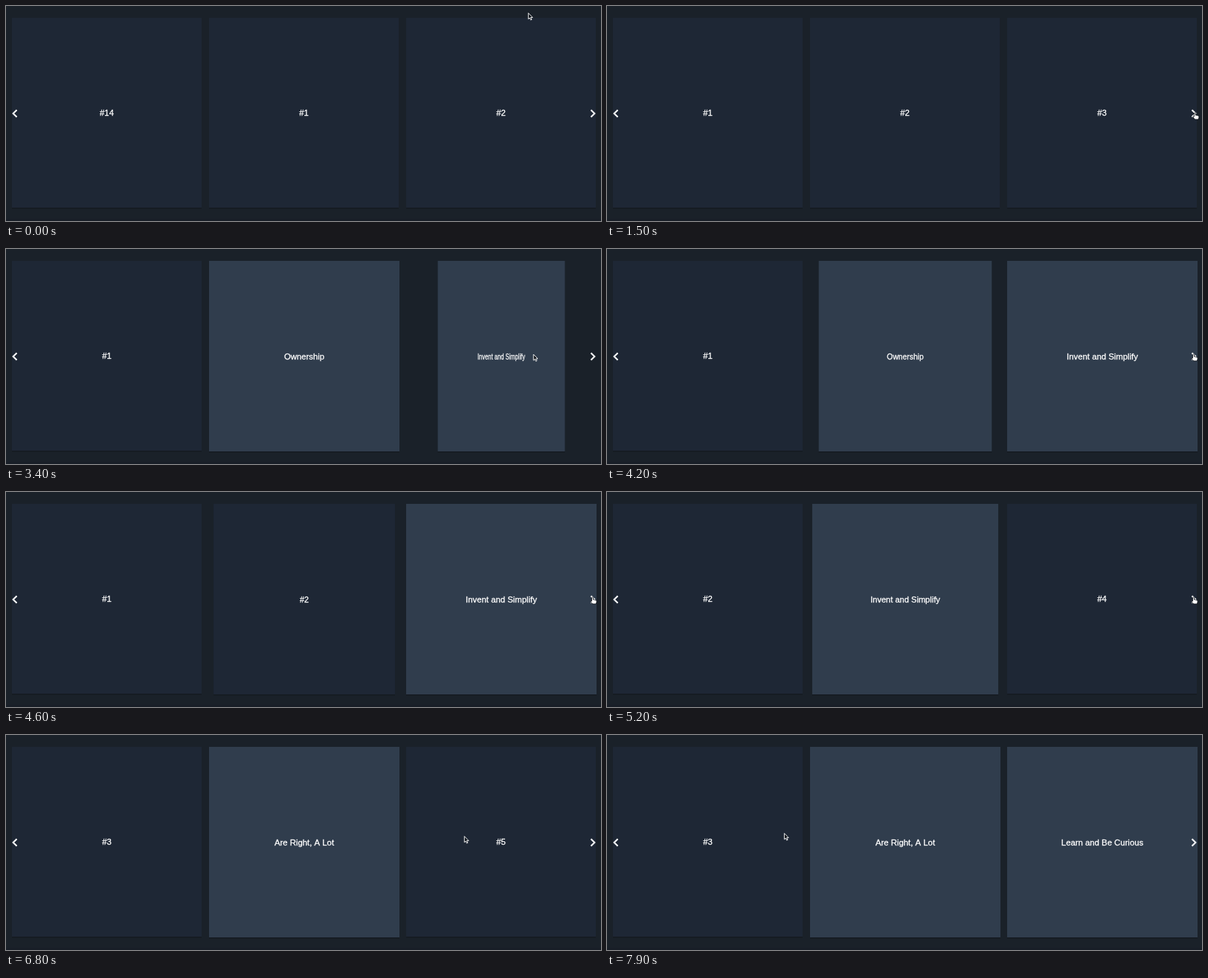
Recreate the animation shown at these times as an HTML page with a canvas. Size 800 px wide and 290 px high, loop 8000 ms.

```html
<!DOCTYPE html>
<html lang="en">
<head>
<meta charset="utf-8">
<title>Flip card carousel</title>
<style>
html, body { margin: 0; width: 100%; height: 100%; overflow: hidden; background: #1a2129; }
canvas { display: block; width: 800px; height: 290px; }
</style>
</head>
<body>
<canvas id="stage" width="800" height="290"></canvas>
<script>
const canvas = document.getElementById('stage');
const ctx = canvas.getContext('2d');
const dpr = window.devicePixelRatio || 1;
canvas.width = 800 * dpr;
canvas.height = 290 * dpr;

const LOOP = 8000, STEP = 100, FLIP = 800, SHIFT_DELAY = 550, COUNT = 14;
const FRONT = '#1e2735', BACK = '#303d4d';

const cards = [
  { id: 2, title: 'Ownership', open: 2100 },
  { id: 3, title: 'Invent and Simplify', open: 3050 },
  { id: 4, title: 'Are Right, A Lot', open: 6050 },
  { id: 5, title: 'Learn and Be Curious', open: 6950 }
];

// Clicks on the right arrow: the middle card closes, then the row moves on
const nextClicks = [750, 4100, 5135];

const moves = [
  { from: 100, to: 800, x: 790.3, y: 144 },
  { from: 1600, to: 2000, x: 486.3, y: 142 },
  { from: 2260, to: 3000, x: 707.3, y: 142 },
  { from: 3350, to: 3900, x: 788.5, y: 142 },
  { from: 5280, to: 5800, x: 480.3, y: 136.6 },
  { from: 6300, to: 6800, x: 616.3, y: 136.6 },
  { from: 7350, to: 7850, x: 238.4, y: 132.6 }
];

const clamp = v => Math.min(1, Math.max(0, v));
const smooth = p => p * p * (3 - 2 * p);

// CSS "ease": solve the Bezier for x, return y
function ease(x) {
  const bezier = (s, a, b) => 3 * (1 - s) * (1 - s) * s * a + 3 * (1 - s) * s * s * b + s * s * s;
  let lo = 0, hi = 1;
  for (let i = 0; i < 24; i++) {
    const mid = (lo + hi) / 2;
    if (bezier(mid, 0.25, 0.25) < x) lo = mid; else hi = mid;
  }
  return bezier(lo, 0.1, 1);
}

// 0 = front, 1 = back
function turnOf(id, t) {
  const card = cards.find(c => c.id === id);
  if (!card || t < card.open) return { turn: 0, moving: false };
  const close = nextClicks[id - 1];
  const closing = t >= close;
  const p = clamp((t - (closing ? close : card.open)) / FLIP);
  return { turn: closing ? 1 - ease(p) : ease(p), moving: p < 1, title: card.title };
}

function pointerAt(t) {
  let x = 702.3, y = 9.5;
  for (const m of moves) {
    const k = smooth(clamp((t - m.from) / (m.to - m.from)));
    x += (m.x - x) * k;
    y += (m.y - y) * k;
  }
  return { x, y };
}

function drawCard(id, slot, t) {
  const { turn, moving, title } = turnOf(id, t);
  const back = turn > 0.5;
  const lifted = back || moving;
  const w = lifted ? 256 : 255;
  const h = w + 1;
  const label = back ? title : '#' + id;
  const base = lifted ? 149 : 148.3;

  ctx.save();
  ctx.translate(8 + slot * 265 + w / 2, 0);
  ctx.scale(Math.max(Math.abs(Math.cos(turn * Math.PI)), 0.001), 1);
  ctx.fillStyle = 'rgba(0,0,0,0.2)';
  ctx.fillRect(-w / 2, 16 + h, w, 1.5);
  ctx.fillStyle = back ? BACK : FRONT;
  ctx.fillRect(-w / 2, 16, w, h);
  ctx.fillStyle = ctx.strokeStyle = '#fff';
  ctx.lineWidth = 0.3;
  ctx.fillText(label, 0, base);
  ctx.strokeText(label, 0, base);
  ctx.restore();
}

function drawChevron(x, dir) {
  ctx.beginPath();
  ctx.moveTo(x - dir * 2.5, 140.2);
  ctx.lineTo(x + dir * 2.4, 145);
  ctx.lineTo(x - dir * 2.5, 149.8);
  ctx.strokeStyle = '#fff';
  ctx.lineWidth = 2;
  ctx.stroke();
}

const arrow = new Path2D('M0 0V8.2L1.9 6.5L3.2 9.4L4.6 8.8L3.3 6H5.8Z');
const hand = new Path2D('M-1 .6Q0-.6 1 .6V3.2Q2 2.6 2.7 3.6Q3.7 3 4.3 4Q5.6 3.6 5.7 5' +
  'Q5.8 7.2 4.7 9H.2Q-1.2 7.4-2.6 5.6Q-2.6 4.4-1 5.2Z');

function drawPointer(t) {
  const { x, y } = pointerAt(t);
  const over = x > 784;
  const shape = over ? hand : arrow;
  ctx.save();
  ctx.translate(x, y);
  ctx.lineJoin = 'round';
  ctx.lineWidth = 0.9;
  ctx.fillStyle = over ? '#fff' : '#10151b';
  ctx.strokeStyle = over ? '#10151b' : '#fff';
  ctx.fill(shape);
  ctx.stroke(shape);
  ctx.restore();
}

function draw(t) {
  ctx.setTransform(dpr, 0, 0, dpr, 0, 0);
  ctx.fillStyle = '#1a2129';
  ctx.fillRect(0, 0, 800, 290);
  ctx.fillStyle = '#181e27';
  ctx.fillRect(0, 287, 800, 3);
  ctx.font = '11.35px "Liberation Sans", Arial, sans-serif';
  ctx.textAlign = 'center';

  const shifts = nextClicks.filter(c => t >= c + SHIFT_DELAY).length;
  for (let slot = 0; slot < 3; slot++) {
    drawCard((shifts + slot + COUNT - 1) % COUNT + 1, slot, t);
  }
  drawChevron(12, -1);
  drawChevron(789, 1);
  drawPointer(t);
}

function tick() {
  const t = performance.now() % LOOP;
  draw(Math.floor(t / STEP) * STEP);
  requestAnimationFrame(tick);
}
tick();
</script>
</body>
</html>
```
